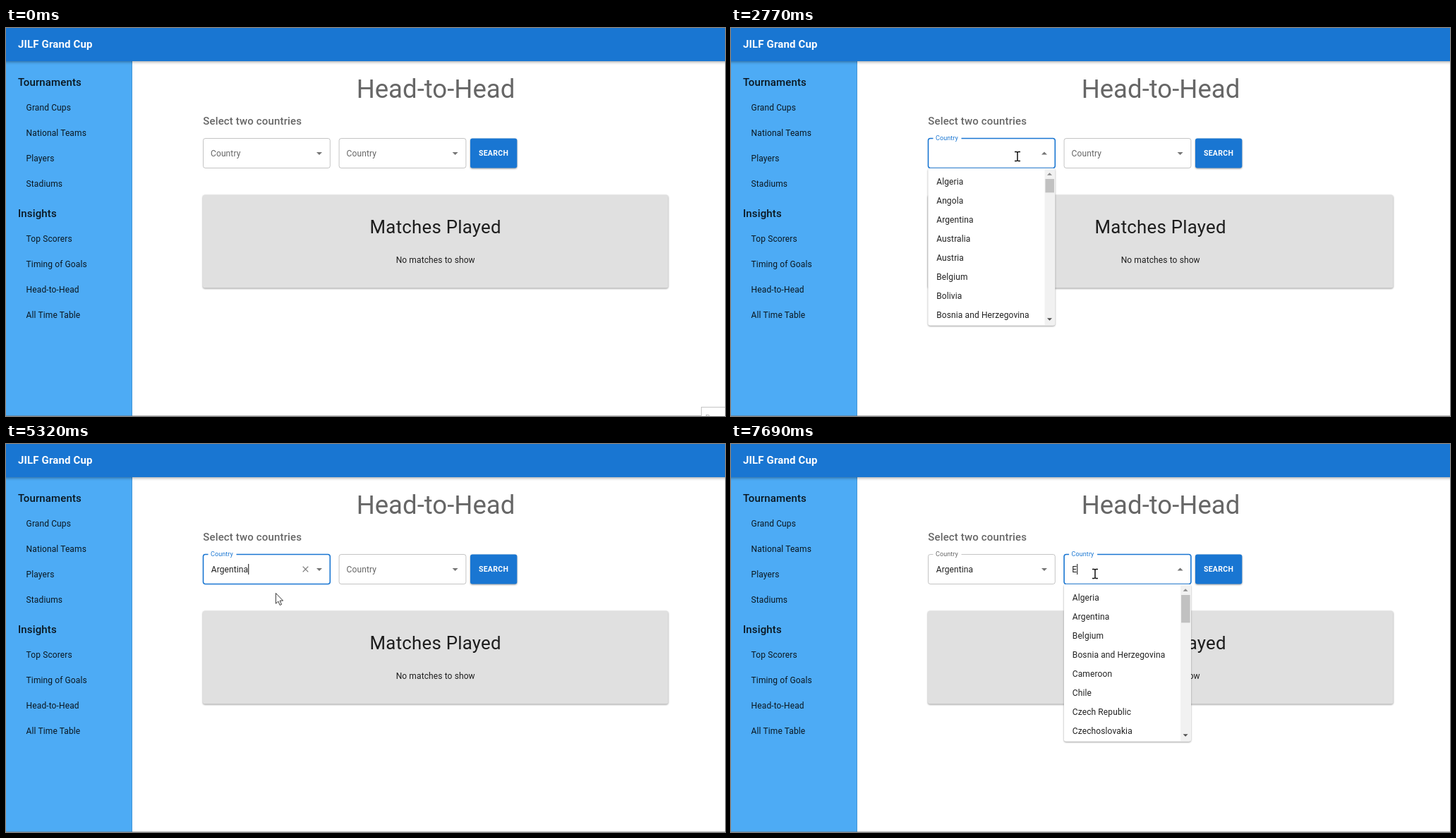
An HTML page that plays this animation: 1019 by 550 pixels, repeating every 8 s.

```html
<!DOCTYPE html>
<html lang="en">
<head>
<meta charset="utf-8">
<title>Head-to-Head</title>
<style>
  html, body { margin: 0; width: 100%; height: 100%; overflow: hidden; background: #fff; }
  svg { display: block; }
  text { font-family: Roboto, sans-serif; letter-spacing: .0094em; white-space: pre; }
  .bar { filter: drop-shadow(0 1.5px 2px rgba(0,0,0,.4)); }
  .paper { filter: drop-shadow(0 1px 1.3px rgba(0,0,0,.4)); }
  .press { mix-blend-mode: multiply; }
</style>
</head>
<body>
<svg id="stage" width="1019" height="550" viewBox="0 0 1019 550">
  <g id="page"></g>
  <g id="live"></g>
</svg>
<script>
const LOOP = 8000, BLUE = '#1976d2', INK = 'rgba(0,0,0,.87)', SOFT = 'rgba(0,0,0,.6)', ICON = 'rgba(0,0,0,.54)';
const ROW = 27.05, FIELD_GAP = 192.6;
const OPEN_1 = 2238, PICK = 5180, CHOSEN = 5250, OPEN_2 = 6540;
const COUNTRIES = ('Algeria,Angola,Argentina,Australia,Austria,Belgium,Bolivia,Bosnia and Herzegovina,Brazil,Bulgaria,' +
  'Cameroon,Canada,Chile,China,Colombia,Costa Rica,Croatia,Cuba,Czech Republic,Czechoslovakia,Denmark,Ecuador,' +
  'Egypt,El Salvador,England,France,Germany,Ghana,Greece,Haiti,Honduras,Hungary,Iceland,Indonesia,Iran,Iraq,' +
  'Israel,Italy,Ivory Coast,Jamaica,Japan,Kuwait,Mexico,Morocco,Netherlands,New Zealand,Nigeria,North Korea,' +
  'Northern Ireland,Norway,Panama,Paraguay,Peru,Poland,Portugal,Qatar,Republic of Ireland,Romania,Russia,' +
  'Saudi Arabia,Scotland,Senegal,Serbia,Slovakia,Slovenia,South Africa,South Korea,Soviet Union,Spain,Sweden,' +
  'Switzerland,Togo,Trinidad and Tobago,Tunisia,Turkey,Ukraine,United Arab Emirates,United States,Uruguay,' +
  'Wales,West Germany,Yugoslavia').split(',');

const CHANGES = [[0], [70], [790, 1560, 12], [1630, 2390, 11], [2440], [2770], [3320], [3780], [4040], [4640],
  [4770, 4980, 4], [5180, 5320, 3], [5720, 6410, 11], [6540, 6750, 4], [7070], [7620, 7690, 2]]
  .flatMap(([a, b, n = 1]) => Array.from({ length: n }, (_, i) => n > 1 ? a + (b - a) * i / (n - 1) : a));
const CARET_RESETS = [OPEN_1, 3780, 4040, CHOSEN, OPEN_2, 7690];

const pen = document.createElement('canvas').getContext('2d');
pen.font = '12px Roboto, sans-serif';
const textWidth = s => pen.measureText(s).width + s.length * .113;
const clamp = v => Math.min(1, Math.max(0, v));
const span = (t, a, b) => clamp((t - a) / (b - a));
const easeOut = (u, k = 3.5) => 1 - (1 - u) ** k;
const smooth = u => u * u * (3 - 2 * u);
const mix = (a, b, u) => a + (b - a) * u;

const text = (x, cy, s, size = 12, fill = INK, extra = '') =>
  `<text x="${x}" y="${cy + size * .355}" font-size="${size}" fill="${fill}" ${extra}>${s}</text>`;
const rect = (x, y, w, h, fill, extra = '') =>
  `<rect x="${x}" y="${y}" width="${w}" height="${h}" fill="${fill}" ${extra}/>`;
const triangle = (x, y, dir, size, fill) =>
  `<path d="M${x - size} ${y - dir * size / 2}h${2 * size}l${-size} ${dir * size}z" fill="${fill}"/>`;

function page() {
  const mid = 'text-anchor="middle"', medium = 'font-weight="500"';
  const menu = (y, head, items) => text(17, y, head, 15, INK, medium) +
    items.map((s, i) => text(28.6, y + 35.7 + i * 36.1, s)).join('');
  return rect(0, 0, 179, 550, '#4dabf5') + rect(178, 47, 1, 503, 'rgba(0,0,0,.12)') +
    menu(77, 'Tournaments', ['Grand Cups', 'National Teams', 'Players', 'Stadiums']) +
    menu(263, 'Insights', ['Top Scorers', 'Timing of Goals', 'Head-to-Head', 'All Time Table']) +
    rect(-9, -9, 1037, 56, BLUE, 'class="bar"') +
    text(17, 22.5, 'JILF Grand Cup', 15, '#fff', 'font-weight="600"') +
    text(609, 86.5, 'Head-to-Head', 36.6, SOFT, mid + ' style="letter-spacing:0"') +
    text(279.3, 131.5, 'Select two countries', 15, SOFT, medium) +
    rect(658, 156.5, 66.3, 42, BLUE, 'rx="3" class="paper"') +
    text(691, 177.5, 'SEARCH', 10.5, '#fff', mid + ' font-weight="600" style="letter-spacing:.0286em"') +
    rect(279, 236.5, 659.5, 132, '#e0e0e0', 'rx="3" class="paper"') +
    text(608.7, 282, 'Matches Played', 25.8, INK, mid) +
    text(608.7, 328.5, 'No matches to show', 12, INK, mid) +
    rect(0, 549, 1019, 1, 'rgba(110,110,110,.45)');
}

function field(f) {
  const up = easeOut(f.raised), gap = 40 * f.notch;
  const stroke = f.focus ? BLUE : f.hover ? INK : 'rgba(0,0,0,.23)';
  const tint = `color-mix(in srgb, ${BLUE} ${f.tint * 100}%, #666)`;
  const end = 290.7 + textWidth(f.value);
  return `<path d="M${286.5 + gap} 156.5H456.3a3 3 0 0 1 3 3V195.5a3 3 0 0 1-3 3H282.5a3 3 0 0 1-3-3V159.5a3 3 0 0 1 3-3H286.5"
      fill="none" stroke="${stroke}" stroke-width="${f.focus ? 1.6 : 1}"/>` +
    text(290, mix(177.3, 156.2, up), 'Country', mix(12, 9, up), tint) +
    text(290.7, 177.6, f.value) +
    (f.caret ? rect(end, 170, 1, 15, '#111') : '') +
    (f.clear ? `<path d="M420.7 173.7l7.6 7.6m0-7.6l-7.6 7.6" stroke="${ICON}" stroke-width="1.2"/>` : '') +
    triangle(444, f.open ? 177.5 : 178, f.open ? -1 : 1, 4, ICON);
}

function popup(query) {
  const rows = COUNTRIES.filter(c => c.toLowerCase().includes(query.toLowerCase()));
  const full = rows.length * ROW + 12, height = Math.min(223, full);
  let out = rect(279.3, 198.7, 180, height, '#fff', 'rx="3" class="paper"');
  rows.slice(0, 8).forEach((s, i) => out += text(291.2, 217.7 + i * ROW, s));
  if (full > height)
    out += rect(444.5, 200, 14.3, 221, '#f1f1f1') + rect(445.5, 214, 12.5, 193 * height / full, '#c1c1c1') +
      triangle(451.5, 207, -1, 3.5, '#8a8a8a') + triangle(451.5, 413, 1, 3.5, '#505050');
  return out;
}

function pointer(t) {
  const move = (a, b, u, v = u) => [mix(a[0], b[0], u), mix(a[1], b[1], v)];
  const edge = [966, 538], under = [510, 201], first = [406, 182], option = [382, 211], second = [516, 184];
  if (t <= 1560) {
    const u = span(t, 790, 1560);
    return move(edge, under, easeOut(u, 1.05), easeOut(u, 1.6));
  }
  if (t < 4640) return move(under, first, easeOut(span(t, 1560, 2010), 1.8));
  if (t < 5700) return move(first, option, smooth(span(t, 4700, 4980)));
  return move(option, second, smooth(span(t, 5700, 6410)));
}

const SHAPES = {
  arrow: '<path d="M.4.5V15.2L3.8 12 6.2 17.4 8.5 16.4 6.2 11.1H10.6Z" fill="#fff" stroke="#222" stroke-width=".9"/>',
  beam: '<path d="M-4-6.5H-1.2L0-5.5 1.2-6.5H4M0-5.5V5.5M-4 6.5H-1.2L0 5.5 1.2 6.5H4" fill="none" stroke="#111" stroke-width="1.5"/>',
  hand: '<path d="M-1.3 10V1a1.3 1.3 0 0 1 2.6 0V6q5-.5 7.5 1.8V13q-1 2-1.5 5H-.5Q-2 14.5-5 11q-.8-2.3 1.3-1.8Z" fill="#fff" stroke="#222" stroke-width=".9"/>'
};

function live(t) {
  const [x, y] = pointer(t);
  const open1 = t >= OPEN_1 && t < CHOSEN, open2 = t >= OPEN_2;
  const inside = left => x >= left && x <= left + 180 && y >= 156 && y <= 198.5;
  const hover1 = inside(279.5), hover2 = inside(279.5 + FIELD_GAP);
  const reset = CARET_RESETS.findLast(r => r <= t);
  const blink = (t - reset) % 1060 < 530;
  const focus1 = t >= OPEN_1 && !open2;
  const value1 = t < 3780 ? '' : t < 4040 ? 'A' : t < CHOSEN ? 'Ar' : 'Argentina';
  const value2 = t < 7690 ? '' : 'E';
  const rise = at => span(t, at - 17, at + 183), notch = at => span(t, at + 33, at + 133);
  const shift = s => `<g transform="translate(${FIELD_GAP})">${s}</g>`;

  let out = field({ value: value1, focus: focus1, hover: hover1, open: open1, caret: focus1 && blink,
    clear: focus1 && t >= CHOSEN, raised: rise(OPEN_1), notch: notch(OPEN_1),
    tint: easeOut(rise(OPEN_1)) - easeOut(rise(OPEN_2)) });
  out += shift(field({ value: value2, focus: open2, hover: hover2, open: open2, caret: open2 && blink,
    raised: rise(OPEN_2), notch: notch(OPEN_2), tint: easeOut(rise(OPEN_2)) }));
  if (open1) out += popup(value1);
  if (open2) out += shift(popup(value2));

  if (t < 70)
    out += rect(985.5, 537.5, 60, 30, '#fff', 'stroke="#c4c4c4"') + text(991, 552, 'Record', 11, '#b4b4b4');
  if ([OPEN_1, PICK, OPEN_2].some(at => t >= at && t < at + 140))
    out += `<circle class="press" cx="${x - 1}" cy="${y}" r="11" fill="#ffe645"/>`;
  if (t >= 790) {
    const shape = (hover1 && x < 435) || (hover2 && x < 628) ? 'beam' : open1 && y > 204 ? 'hand' : 'arrow';
    out += `<g transform="translate(${x} ${y})">${SHAPES[shape]}</g>`;
  }
  return out;
}

const byId = id => document.getElementById(id);
byId('page').innerHTML = page();
let shown = -1;
const start = performance.now();
function tick() {
  const now = (performance.now() - start) % LOOP;
  const t = CHANGES.findLast(c => c <= now);
  if (t !== shown) byId('live').innerHTML = live(shown = t);
  requestAnimationFrame(tick);
}
tick();
</script>
</body>
</html>
```
